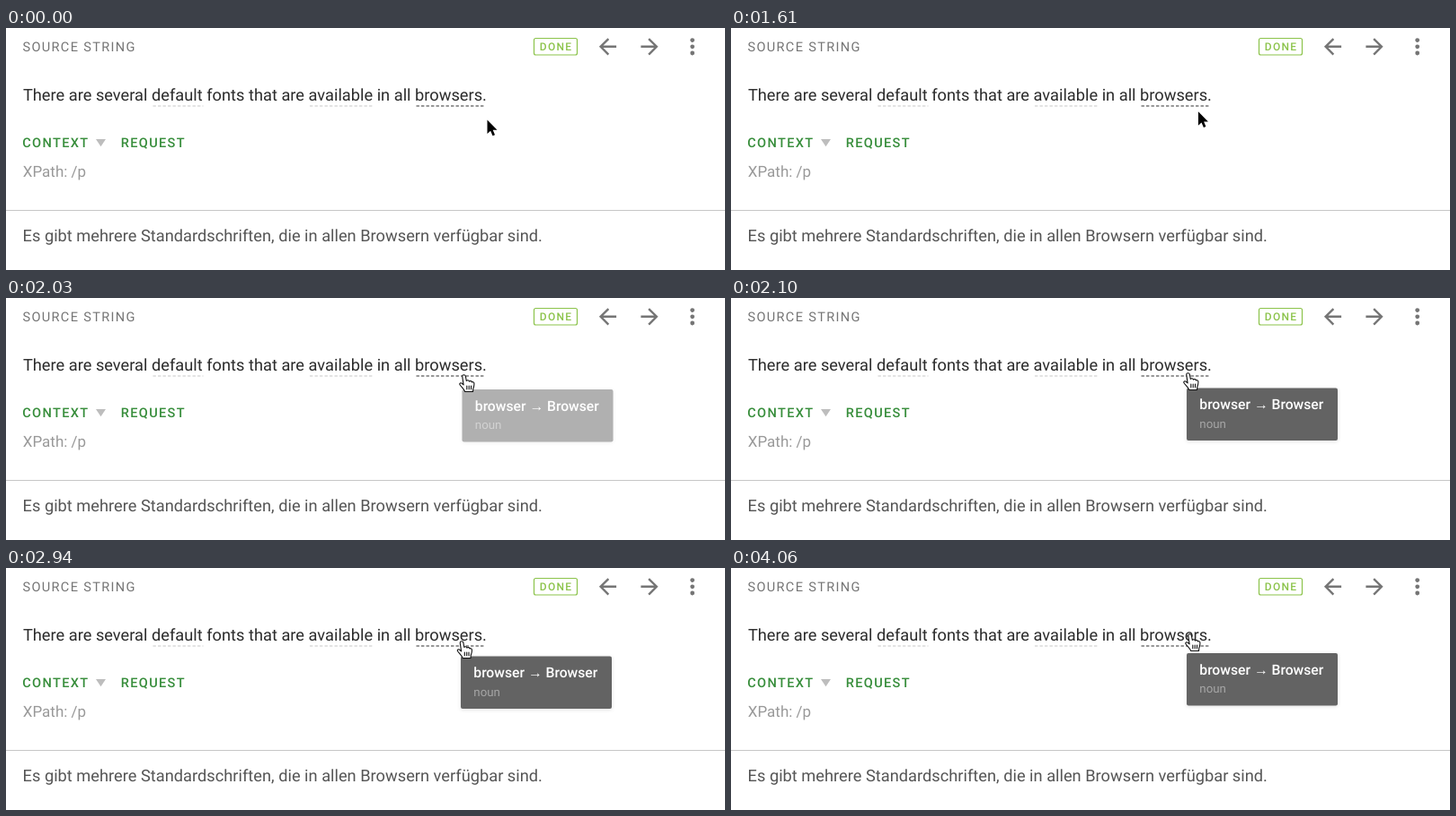
An HTML page for the animation above (4130 ms loop, 800 by 270 pixels).

```html
<!DOCTYPE html>
<html lang="en">
<head>
<meta charset="utf-8">
<title>Translation editor</title>
<style>
  html, body { margin: 0; width: 100%; height: 100%; overflow: hidden; background: #fff; }
  svg { display: block; width: 100vw; height: 100vh; }
  text { font-family: Roboto, sans-serif; text-rendering: geometricPrecision; white-space: pre; }
  .body { font-size: 18.25px; }
  .caps { font-size: 14.6px; letter-spacing: 1.3px; }
  .link { fill: #388e3c; font-weight: 500; }
  .icon { fill: #757575; }
  .dash { fill: none; stroke: #c8c8c8; stroke-width: 1.2; stroke-dasharray: 3.4 2.1; }
  #tip { filter: drop-shadow(0 1px 2px rgba(0, 0, 0, .13)); }
</style>
</head>
<body>
<svg viewBox="0 0 800 270">
  <rect width="800" height="270" fill="#fff"/>

  <text class="caps" x="18.5" y="25.7" fill="#757575">SOURCE STRING</text>
  <rect x="587.5" y="11.5" width="48" height="18.5" rx="2" fill="none" stroke="#8bc34a" stroke-width="1.2"/>
  <text x="593.8" y="24.9" font-size="12" font-weight="500" letter-spacing="1.3" fill="#8bc34a">DONE</text>
  <g class="icon">
    <path id="arrow" transform="translate(669.5 20.8) scale(1.2)" d="M8-1H-4.17L1.42-6.59 0-8-8 0 0 8 1.41 6.59-4.17 1H8z"/>
    <path transform="translate(716 20.8) scale(-1.2 1.2)" d="M8-1H-4.17L1.42-6.59 0-8-8 0 0 8 1.41 6.59-4.17 1H8z"/>
    <circle cx="763.7" cy="13.6" r="2.4"/>
    <circle cx="763.7" cy="20.8" r="2.4"/>
    <circle cx="763.7" cy="28" r="2.4"/>
  </g>

  <text class="body" x="18.9" y="81.4" fill="#2b2b2b">There are several default fonts that are available in all browsers.</text>
  <path class="dash" d="M163.5 87H219.5M338 87H409.5"/>
  <path class="dash" d="M456.5 87H531.5" style="stroke:#333"/>

  <text class="caps link" x="18.3" y="132.6">CONTEXT</text>
  <path d="M100 124H111L105.5 132.3Z" fill="#bdbdbd"/>
  <text class="caps link" x="127.8" y="132.6">REQUEST</text>
  <text x="18.8" y="166.3" font-size="17" fill="#999">XPath: /p</text>

  <rect y="203" width="800" height="1" fill="#c6c6c6"/>
  <text class="body" x="18.6" y="237.7" fill="#555">Es gibt mehrere Standardschriften, die in allen Browsern verfügbar sind.</text>

  <g id="tip">
    <rect width="168" height="58.5" rx="2" fill="#636363"/>
    <text x="14.3" y="23.5" font-size="15.7" font-weight="500" fill="#fff">browser <tspan font-family="Liberation Sans, sans-serif" font-weight="400">→</tspan> Browser</text>
    <text x="14.3" y="44.2" font-size="13.3" fill="#a6a6a6">noun</text>
  </g>

  <path id="pointer" d="M0 0V15.6L3.6 12.3 6 17.8 8.5 16.8 6.2 11.3H11Z" fill="#000" stroke="#fff" stroke-width="1.1" paint-order="stroke"/>
  <g id="hand" stroke="#111" stroke-width="1.1" stroke-linecap="round" stroke-linejoin="round">
    <path fill="#fff" d="M-1.8 1.9C-1.8-.4 1.5-.4 1.9 1.9L2.8 7C3.4 6 5.6 6 5.9 7.6 6.8 6.6 8.6 7 8.9 8.4 10 7.8 11.4 8.4 11.4 10 11.5 13 10.8 14 10.2 16L10 19H1.2C.6 16.5-2.5 14-4.5 11.2-5.2 9.6-3.4 8.6-2 10L-.4 11.4Z"/>
    <path fill="none" d="M3.3 12.5V16.3M5.7 12.5V16.3M8 12.5V16.3"/>
  </g>
</svg>
<script>
  const LOOP = 4130, STEP = 70;
  const pointer = document.getElementById('pointer');
  const hand = document.getElementById('hand');
  const tip = document.getElementById('tip');

  // [time, x, y]
  const cursorPath = [[1120, 535.5, 102.5], [1960, 510.5, 87.5], [2100, 508.5, 83.5],
    [2310, 507, 81.5], [3990, 507, 81.5], [4060, 510.5, 73.5]];
  const tipPath = [[2030, 507.5, 102], [2100, 507, 100.5], [2310, 506, 98.5],
    [3990, 506, 98.5], [4060, 507, 95]];

  const smooth = k => k * k * (3 - 2 * k);

  function along(path, t, ease = k => k) {
    if (t <= path[0][0]) return path[0].slice(1);
    for (let i = 1; i < path.length; i++) {
      const [t0, x0, y0] = path[i - 1], [t1, x1, y1] = path[i];
      if (t <= t1) {
        const k = (i === 1 ? ease : k => k)((t - t0) / (t1 - t0));
        return [x0 + (x1 - x0) * k, y0 + (y1 - y0) * k];
      }
    }
    return path[path.length - 1].slice(1);
  }

  const place = (el, [x, y]) => el.setAttribute('transform', `translate(${x} ${y})`);
  const show = (el, alpha) => el.setAttribute('opacity', alpha);

  function draw(now) {
    const t = Math.floor((now % LOOP) / STEP) * STEP;
    const at = along(cursorPath, t, smooth);
    const hover = at[1] < 88.2;
    place(pointer, at);
    place(hand, at);
    place(tip, along(tipPath, t));
    show(pointer, hover ? 0 : 1);
    show(hand, hover ? 1 : 0);
    show(tip, Math.min(1, Math.max(0, (t - 1960) / 140)));
  }

  const start = performance.now();
  function tick() {
    draw(performance.now() - start);
    requestAnimationFrame(tick);
  }
  tick();
</script>
</body>
</html>
```
